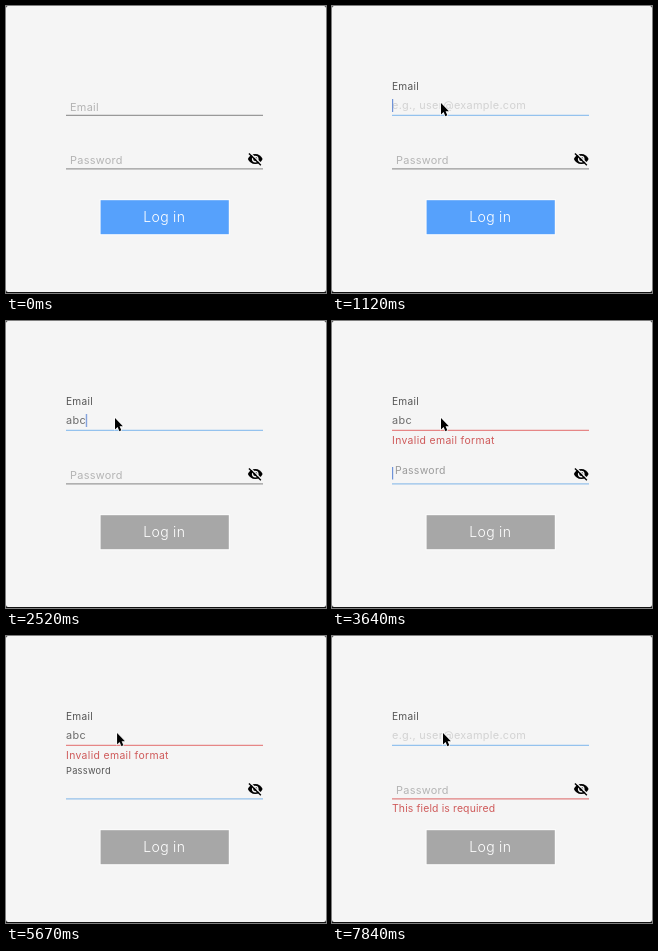
An HTML page that plays this animation: 320 by 287 pixels, repeating every 8000 ms.

```html
<!DOCTYPE html>
<html lang="en">
<head>
<meta charset="utf-8">
<title>Login form</title>
<style>
  html, body { margin: 0; width: 100%; height: 100%; overflow: hidden; background: #111; }
  svg { display: block; width: 100vw; height: 100vh; }
  text { font: 10.9px Inter, "Open Sans", sans-serif; letter-spacing: .3px; fill: #6c6c6c; }

  /* Percentages are milliseconds / 80. */
  .anim, .anim tspan { animation: 8s linear infinite; }
  .anim.step, .anim tspan { animation-timing-function: step-end; }

  .line { stroke: #999; stroke-width: 1.2; }
  .label { fill: #b4b4b4; }
  .error { font-size: 10.4px; fill: #cf5a5a; }
  .hint { fill: #d2d2d2; }
  .caret { fill: #6f93d8; }
  .button { fill: #56a1fc; }
  .caption { font-size: 14px; font-weight: 300; fill: #fff; text-anchor: middle; }

  #email-label { animation-name: email-label; }
  @keyframes email-label {
    0%, 11% { transform: translate(64px, 105px); fill: #b4b4b4; }
    13.9%, 100% { transform: translate(60px, 84.4px) scale(.93); fill: #555; }
  }

  #pass-label { animation-name: pass-label; }
  @keyframes pass-label {
    0%, 44.9%, 74.4%, 100% { transform: translate(64px, 158.4px); fill: #b4b4b4; }
    47.2%, 72.1% { transform: translate(60px, 137.7px) scale(.85); fill: #555; }
  }

  #email-line { animation-name: email-line; }
  @keyframes email-line {
    0%, 11% { stroke: #999; }
    13.9%, 45%, 73.5%, 100% { stroke: #94c2ee; }
    45.4%, 72.2% { stroke: #e68686; }
  }

  #pass-line { animation-name: pass-line; }
  @keyframes pass-line {
    0%, 45% { stroke: #999; }
    45.4%, 72.2% { stroke: #94c0ea; }
    73.5%, 100% { stroke: #e08080; }
  }

  #email-error { letter-spacing: .35px; animation-name: email-error; }
  @keyframes email-error {
    0%, 45%, 73.5%, 100% { opacity: 0; }
    45.4%, 72.2% { opacity: 1; }
  }

  #pass-error { letter-spacing: .15px; animation-name: pass-error; }
  @keyframes pass-error {
    0%, 72.2% { opacity: 0; }
    73.5%, 100% { opacity: 1; }
  }

  #hint { animation-name: hint; }
  @keyframes hint {
    0%, 11.2%, 26.13%, 87.1% { opacity: 0; }
    13.9%, 26.12%, 88.3%, 100% { opacity: 1; }
  }

  tspan { fill-opacity: 0; }
  #a { animation-name: type-a; }
  #b { animation-name: type-b; }
  #c { animation-name: type-c; }
  @keyframes type-a { 0%, 87.38% { fill-opacity: 0; } 26.13% { fill-opacity: 1; } }
  @keyframes type-b { 0%, 85.63% { fill-opacity: 0; } 27.88% { fill-opacity: 1; } }
  @keyframes type-c { 0%, 83.88% { fill-opacity: 0; } 31.38% { fill-opacity: 1; } }

  #email-caret-spot { animation-name: caret-spot; }
  @keyframes caret-spot {
    0%, 87.38%, 100% { transform: translateX(0); }
    26.13%, 85.63% { transform: translateX(6.5px); }
    27.88%, 83.88% { transform: translateX(13.5px); }
    31.38% { transform: translateX(19.8px); }
  }

  #email-caret { animation-name: email-blink; }
  @keyframes email-blink {
    0%, 11.2%, 21.9%, 26.12%, 41.2%, 72.3%, 81.4%, 83.87%, 98%, 100% { opacity: 0; }
    12%, 19.9%, 26.13%, 39.1%, 73.2%, 79.4%, 83.88%, 96% { opacity: 1; }
  }

  #pass-caret { animation-name: pass-blink; }
  @keyframes pass-blink {
    0%, 45%, 54.3%, 59.2%, 67.2%, 100% { opacity: 0; }
    45.4%, 52.9%, 60.4%, 65.8% { opacity: 1; }
  }

  #button { animation-name: disable; }
  @keyframes disable {
    0%, 25.9% { fill: #56a1fc; }
    28%, 100% { fill: #a7a7a7; }
  }

  #cursor { animation-name: point; }
  @keyframes point {
    0%, 1.7% { transform: translate(245px, 232px); opacity: 0; }
    1.71% { transform: translate(245px, 232px); opacity: 1; }
    4.4% { transform: translate(150px, 129px); }
    7% { transform: translate(98px, 71px); }
    9.6%, 63% { transform: translate(109px, 97px); }
    65.6% { transform: translate(123.6px, 94px); }
    68% { transform: translate(119px, 79px); }
    70.9%, 100% { transform: translate(111px, 97px); opacity: 1; }
  }
</style>
</head>
<body>
<svg viewBox="0 0 320 287">
  <rect width="320" height="286" rx="2" fill="#f5f5f5"/>

  <!-- Email field -->
  <text id="email-label" class="label anim">Email</text>
  <text id="hint" class="hint anim" x="60" y="103.4">e.g., user@example.com</text>
  <text class="anim" x="60" y="103.4"><tspan id="a">a</tspan><tspan id="b">b</tspan><tspan id="c">c</tspan></text>
  <path id="email-line" class="line anim" d="M60 109.4H257"/>
  <text id="email-error" class="error anim" x="60" y="122.6">Invalid email format</text>
  <g id="email-caret-spot" class="anim step">
    <rect id="email-caret" class="caret anim" x="60" y="93" width="1.2" height="13"/>
  </g>

  <!-- Password field -->
  <text id="pass-label" class="label anim">Password</text>
  <path id="pass-line" class="line anim" d="M60 162.8H257"/>
  <text id="pass-error" class="error anim" x="60" y="176">This field is required</text>
  <rect id="pass-caret" class="caret anim" x="60" y="146" width="1.2" height="12.5"/>
  <g transform="translate(241.2 145) scale(.67)">
    <path d="M1 12C2.7 7.6 7 4.5 12 4.5S21.3 7.6 23 12C21.3 16.4 17 19.5 12 19.5S2.7 16.4 1 12Z"/>
    <circle cx="12" cy="12" r="5" fill="#f5f5f5"/>
    <circle cx="12" cy="12" r="3"/>
    <path d="M4.5 2.5L22 20" stroke="#f5f5f5" stroke-width="2"/>
    <path d="M2.6 3.6L20.4 21.4" stroke="#000" stroke-width="2"/>
  </g>

  <rect x="93.6" y="193.2" width="130.2" height="36" fill="#fcfcfc"/>
  <rect id="button" class="button anim" x="94.6" y="194.2" width="128.2" height="34"/>
  <text class="caption" x="158.3" y="216.3">Log in</text>

  <path id="cursor" class="anim" d="M0 0V11.4L2.6 9L4.4 13.2L6.3 12.3L4.6 8.3H7.9Z"
        stroke="#fff" stroke-width="1.2" paint-order="stroke"/>
</svg>
</body>
</html>
```
